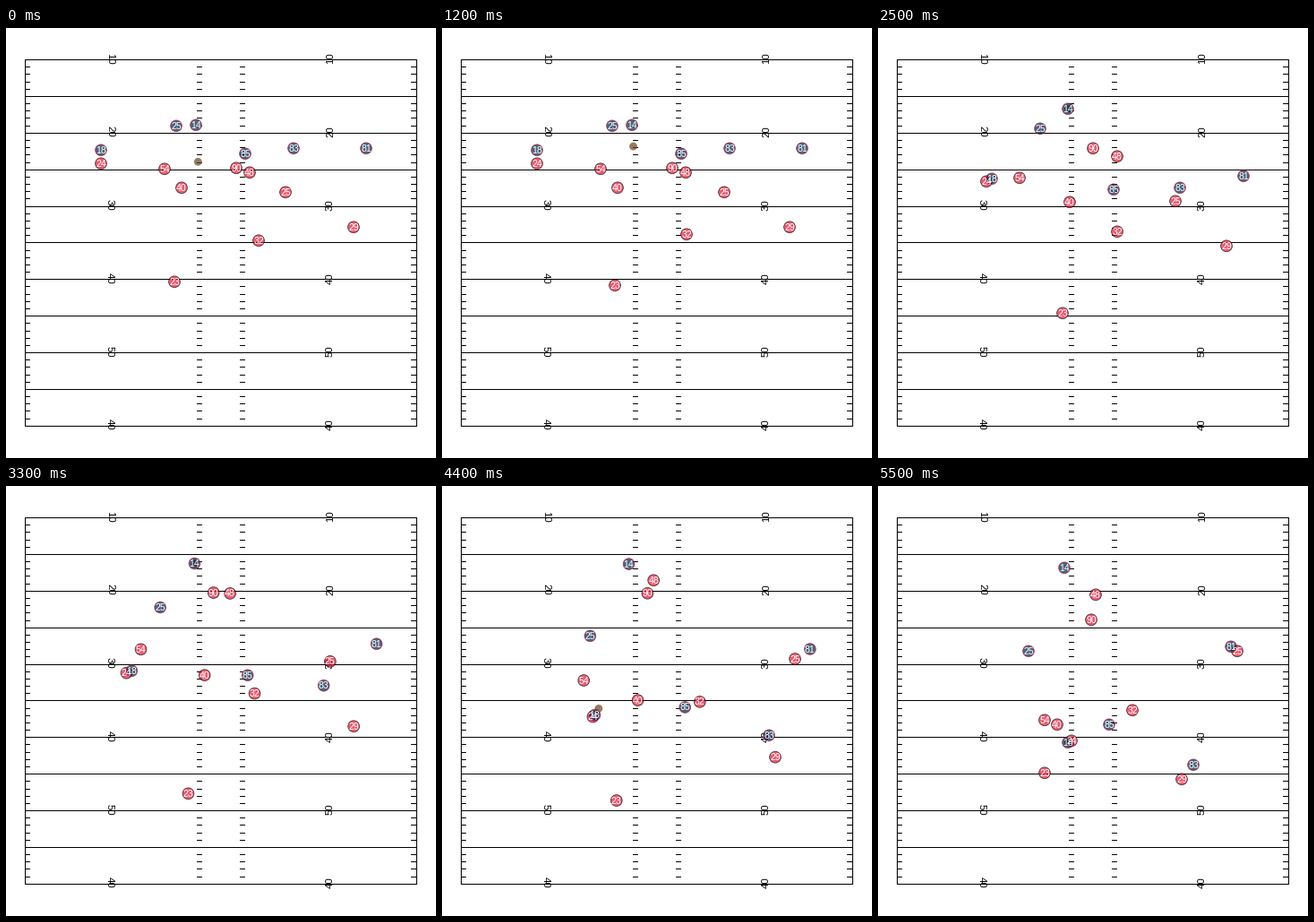
A matplotlib script for the animation above (5.6 s loop, 480 by 480 pixels).

```python
import numpy as np
import matplotlib.pyplot as plt
from matplotlib.animation import FuncAnimation
from matplotlib.colors import to_rgba
from matplotlib.patches import Circle

SIZE, FRAMES, STEP_MS = 480, 56, 100
LEFT, RIGHT, TOP, YARD = 21, 458, 35.6, 8.174
ALPHA = 0.7

# Players pass their waypoints at these times; those with four points
# stand still until the snap, those with five creep before it.
KEYS = np.array([0, 12, 25, 40, 55], float)
AWAY = {
    "25": [(190, 109), (181, 112), (166, 158), (168, 184)],
    "14": [(212, 108), (212, 90), (209, 86), (208, 91)],
    "85": [(267, 140), (263, 180), (274, 236), (258, 266)],
    "83": [(321, 134), (337, 178), (366, 261), (352, 311)],
    "81": [(402, 134), (408, 165), (415, 181), (394, 179)],
    "18": [(106, 136), (127, 168), (156, 240), (212, 286)],
}
HOME = {
    "24": [(106, 151), (121, 171), (152, 243), (216, 284)],
    "54": [(177, 157), (158, 167), (151, 201), (186, 261)],
    "40": [(196, 178), (214, 194), (223, 228), (200, 266)],
    "90": [(257, 156), (240, 134), (228, 113), (238, 149)],
    "48": [(272, 161), (267, 143), (237, 104), (243, 121)],
    "25": [(312, 183), (315, 183), (332, 193), (387, 195), (401, 184)],
    "32": [(282, 237), (273, 230), (267, 227), (287, 237), (284, 250)],
    "29": [(388, 222), (389, 243), (382, 291), (339, 327)],
    "23": [(188, 283), (193, 287), (206, 318), (198, 356), (186, 320)],
}
SPOT = np.array([214, 149])
SNAP, HELD, THROW, CATCH = 10, 15, 35, 44.5

plt.rcParams["font.family"] = ["Liberation Sans", "DejaVu Sans"]


def smooth_path(points):
    """Cubic through the waypoints: starts from rest, slows at the end."""
    p = np.array(points, float)
    keys = KEYS[-len(p):]
    h = np.diff(keys)[:, None]
    d = np.diff(p, axis=0) / h
    inner = (h[1:] * d[:-1] + h[:-1] * d[1:]) / (h[1:] + h[:-1])
    m = np.vstack([0 * d[:1], inner, 0.5 * d[-1:]])

    def at(t):
        t = max(t, keys[0])
        i = min(np.searchsorted(keys, t, side="right") - 1, len(h) - 1)
        w = h[i, 0]
        u = (t - keys[i]) / w
        s = u * u * (3 - 2 * u)
        return (p[i] * (1 - s) + p[i + 1] * s
                + w * u * (1 - u) * (m[i] * (1 - u) - m[i + 1] * u))
    return at


passer, receiver = smooth_path(AWAY["14"]), smooth_path(AWAY["18"])


def glide(a, b, t, start, end):
    u = np.clip((t - start) / (end - start), 0, 1)
    return a + (b - a) * u


def ball_at(t):
    if t < HELD:
        return glide(SPOT, passer(HELD), t, SNAP, HELD)
    if t < THROW:
        return passer(t)
    if t < CATCH:
        return glide(passer(THROW), receiver(CATCH), t, THROW, CATCH)
    return receiver(t)


fig = plt.figure(figsize=(SIZE / 72, SIZE / 72), dpi=72, facecolor="white")
ax = fig.add_axes([0, 0, 1, 1])
ax.set_xlim(0, SIZE)
ax.set_ylim(SIZE, 0)
ax.axis("off")


def line(x0, y0, x1, y1):
    ax.plot([x0, x1], [y0, y1], color="black", lw=1, snap=False,
            solid_capstyle="butt", zorder=1)


def row(yard):
    return np.floor(TOP + YARD * yard) + 0.5


def draw_field():
    for yard in range(51):
        y = row(yard)
        if yard % 5 == 0:
            line(LEFT, y, RIGHT + 1, y)
        else:
            for x in (LEFT, 213, 261, RIGHT - 6):
                line(x, y, x + 6, y)
    for x in (LEFT, RIGHT):
        line(x + 0.5, row(0), x + 0.5, row(50))
    for k, label in enumerate(("10", "20", "30", "40", "50", "40")):
        y = TOP + 10 * YARD * k - 1.5
        for x, angle in ((113, 270), (365, 90)):
            ax.text(x, y, label, rotation=angle, rotation_mode="anchor",
                    ha="center", va="baseline", size=11.4, color="black", zorder=1)


def disc(radius, fill, edge, z):
    return ax.add_patch(Circle((0, 0), radius, facecolor=to_rgba(fill, ALPHA),
                               edgecolor=edge, lw=0.8, zorder=z))


def add_team(team, fill, edge, z):
    players = []
    for number, points in team.items():
        dot = disc(6.4, fill, to_rgba(edge, ALPHA), z)
        label = ax.text(0, 0, number, color="white", size=10.5, ha="center",
                        va="baseline", zorder=z + 3)
        players.append((smooth_path(points), dot, label))
    return players


draw_field()
ball = disc(4.4, "#654321", "none", 2)
players = add_team(HOME, "#e31837", "black", 3) + add_team(AWAY, "#002244", "#c60c30", 4)


def update(t):
    for path, dot, label in players:
        x, y = path(t)
        dot.center = x, y + 0.3
        label.set_position((x, y + 3.8))
    ball.center = tuple(ball_at(t) + 0.3)
    return []


anim = FuncAnimation(fig, update, frames=FRAMES, interval=STEP_MS,
                     init_func=lambda: update(0), repeat=True, repeat_delay=0)
plt.show()
```
